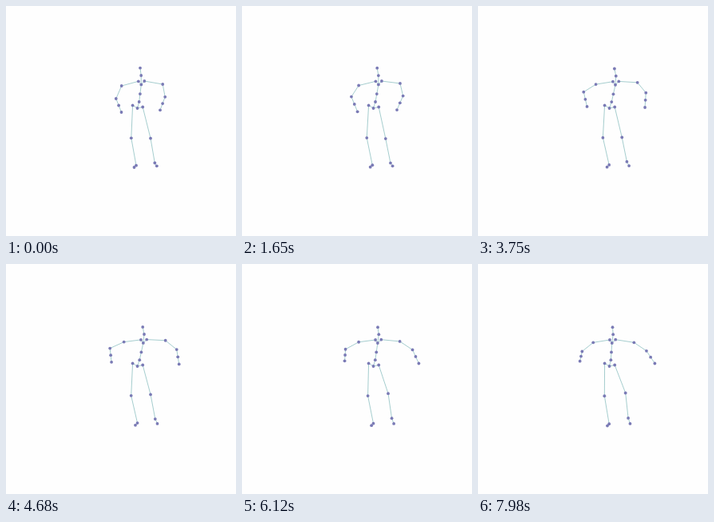
Write an HTML page with a canvas that moves like this. It is 288 px wide and 288 px high and loops after 8 s.

```html
<!DOCTYPE html>
<html lang="en">
<head>
<meta charset="utf-8">
<title>Stick figure raising its arms</title>
<style>
  html, body { margin: 0; width: 100%; height: 100%; overflow: hidden; background: #fefefe; }
  canvas { display: block; width: 288px; height: 288px; }
</style>
</head>
<body>
<canvas id="stage"></canvas>
<script>
const SIZE = 288, LOOP = 8000, STEP = 30;

const canvas = document.getElementById('stage');
const ctx = canvas.getContext('2d');
const ratio = window.devicePixelRatio || 1;
canvas.width = canvas.height = Math.round(SIZE * ratio);

const progress = (t, from, to) => Math.min(1, Math.max(0, (t - from) / (to - from)));
const smooth = u => u * u * (3 - 2 * u);
const smoother = u => u * u * u * (u * (6 * u - 15) + 10);

// Two motions drive the whole body: the arms lift while the trunk sways out and back
const liftAt = t => smoother(progress(t, 700, 6400));
const swayAt = t => t < 4200
  ? Math.sin(Math.PI / 2 * t / 4200)
  : 1 - 1.55 * smooth(progress(t, 4200, LOOP));

function pose(lift, sway) {
  // Resting place plus its travel with each motion
  const joint = (x, y, liftX = 0, liftY = 0, swayX = 0, swayY = 0) =>
    [x + lift * liftX + sway * swayX, y + lift * liftY + sway * swayY];
  const between = (a, b, part) => a.map((v, i) => v + (b[i] - v) * part);

  const pelvis = joint(164.5, 128);
  const waist = joint(166.7, 120, 0, 0.2, 0.6);
  const chest = joint(169.3, 98.4, 0, 0.6, 2.75);
  const spine = between(chest, waist, 0.54);
  const neck = joint(169.2, 87, 1.5, 1.2, 2.75);
  const head = joint(168, 77.6, 1.6, 1.6, 2);

  const arm = (collar, shoulder, elbow, hand) =>
    [chest, collar, shoulder, elbow, between(elbow, hand, 0.5), hand];

  return [
    [pelvis, waist, spine, chest, neck, head],
    arm(joint(165.8, 94.3, 0.7, 0.7, 2.75),
        joint(144.7, 100, 0.9, -2.1, 2.4, -0.7),
        joint(137.8, 116, -8, -8.5, -1, -3.6),
        joint(144.5, 133, -16.2, -11.6, 1.2, -0.5)),
    arm(joint(173.3, 94, 0.4, 0.7, 2.75),
        joint(196.2, 98, 0.8, -0.7, 3, -1.8),
        joint(199.2, 113.8, 13.6, -6, 3.4, -1.8),
        joint(193, 130.3, 28.4, -5.8)),
    [pelvis,
     joint(158.6, 124.4),
     joint(156.8, 165.3, 1, -0.2, -1, -0.3),
     joint(163, 199.7, 1.4, 0.1, 0.4, -0.8),
     joint(160.5, 202, 1.6, 0.3, 0.2, -0.5)],
    [pelvis,
     joint(171.2, 126.5),
     joint(181, 165.7, 2.5, -3.7, -2.2, 0.9),
     joint(186.3, 196.5, 1.4, -3.4, -0.7, 0.4),
     joint(188.8, 200.3, 1.4, -0.4, -0.5)]
  ];
}

function draw(t) {
  const chains = pose(liftAt(t), swayAt(t));

  ctx.setTransform(ratio, 0, 0, ratio, 0, 0);
  ctx.fillStyle = '#fefefe';
  ctx.fillRect(0, 0, SIZE, SIZE);

  ctx.strokeStyle = '#8fc0c2';
  ctx.lineWidth = 0.8;
  ctx.lineJoin = 'round';
  for (const chain of chains) {
    ctx.beginPath();
    for (const point of chain) ctx.lineTo(...point);
    ctx.stroke();
  }

  ctx.fillStyle = '#7a7ab5';
  for (const point of new Set(chains.flat())) {
    ctx.beginPath();
    ctx.arc(...point, 1.9, 0, Math.PI * 2);
    ctx.fill();
  }
}

function tick() {
  const t = performance.now() % LOOP;
  draw(Math.floor(t / STEP) * STEP);
  requestAnimationFrame(tick);
}
tick();
</script>
</body>
</html>
```
